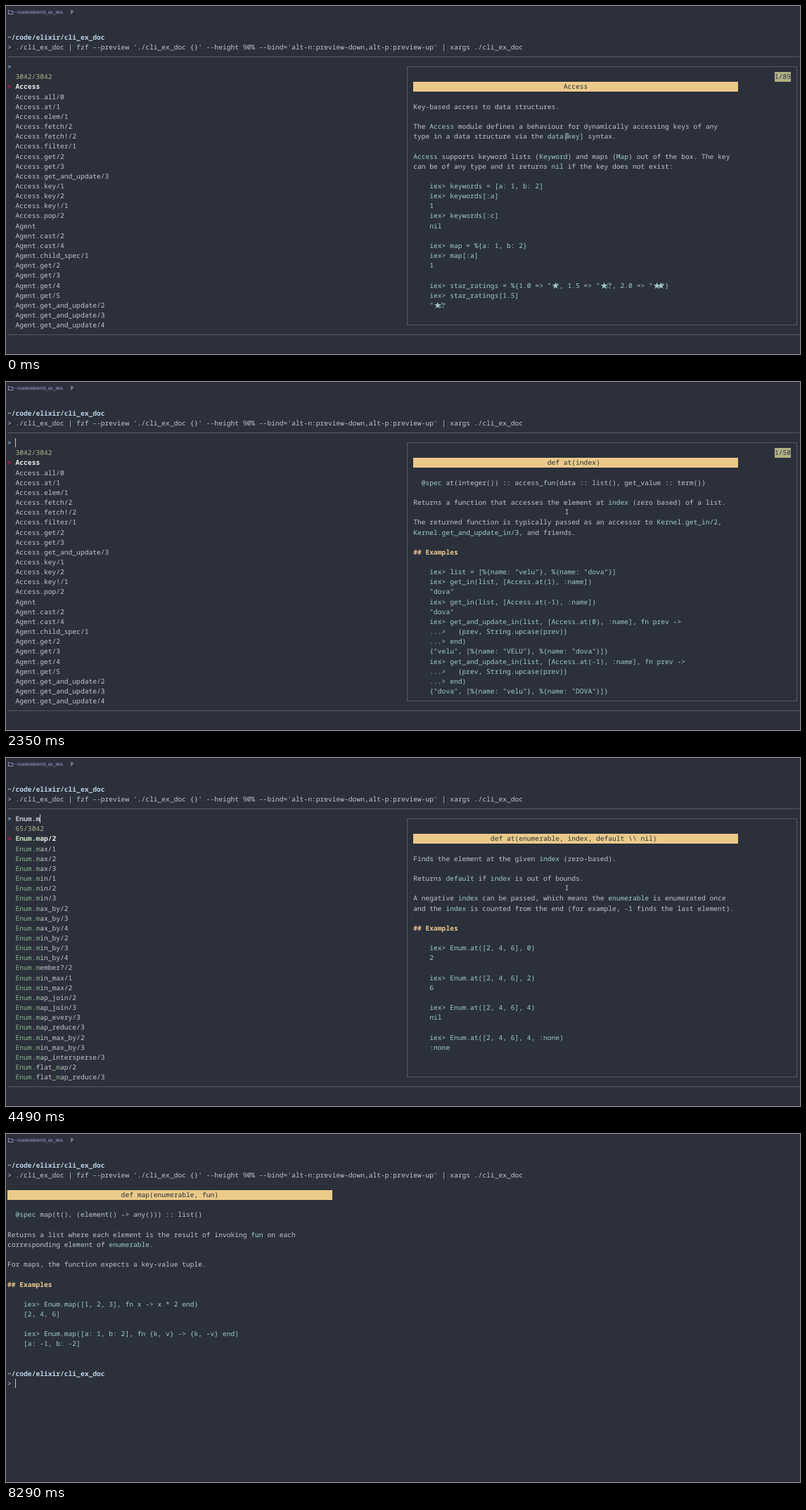
An HTML page with a canvas that plays this animation: 1129x496 px, repeating every 8.99 s.

```html
<!DOCTYPE html>
<html lang="en">
<head>
<meta charset="utf-8">
<title>Terminal documentation browser</title>
<style>
  html, body { margin: 0; width: 100%; height: 100%; overflow: hidden; background: #2b303b; }
  canvas { display: block; width: 1129px; height: 496px; }
</style>
</head>
<body>
<canvas></canvas>
<script>
const WIDTH = 1129, HEIGHT = 496, LOOP = 8990;
const CELL = 5.772, LINE = 14.16, LEFT = 2, TOP = 44.3;
const MONO = '"Noto Sans Mono", monospace';
const PREVIEW_COL = 100, LIST_ROW = 5, LIST_SIZE = 25;
const C = {
  bg: '#2b303b', text: '#c0c5ce', path: '#c0d5e6', teal: '#a0cbc5', yellow: '#ebca89',
  info: '#b2b186', border: '#555a63', prompt: '#87afd7', pointer: '#dc1448',
  bright: '#f0f0f0', match: '#87af87', brightMatch: '#c3e0bd', tab: '#b7a2e6'
};

const CWD = '~/code/elixir/cli_ex_doc';
const COMMAND = "> ./cli_ex_doc | fzf --preview './cli_ex_doc {}' --height 90% " +
  "--bind='alt-n:preview-down,alt-p:preview-up' | xargs ./cli_ex_doc";

// Words starting with a dot get the module name in front.
const names = (module, words) => words.split(' ').map(w => w[0] === '.' ? module + w : w);

const ALL = [
  ...names('Access', 'Access .all/0 .at/1 .elem/1 .fetch/2 .fetch!/2 .filter/1 .get/2 .get/3 ' +
    '.get_and_update/3 .key/1 .key/2 .key!/1 .pop/2'),
  ...names('Agent', 'Agent .cast/2 .cast/4 .child_spec/1 .get/2 .get/3 .get/4 .get/5 ' +
    '.get_and_update/2 .get_and_update/3 .get_and_update/4')
];
const ENUM = names('Enum', 'Enum .at/2 .at/3 Macro.Env .map/2 .max/1 .max/2 .max/3 .min/1 .min/2 .min/3 ' +
  '.sum/1 .zip/1 .zip/2 Enumerable .all?/1 .all?/2 .any?/1 .any?/2 .drop/2 .each/2 .find/2 .find/3 ' +
  '.into/2 .into/3 .join/1 .join/2 .sort/1 .sort/2');
const ENUM_M = names('Enum', '.map/2 .max/1 .max/2 .max/3 .min/1 .min/2 .min/3 .max_by/2 .max_by/3 .max_by/4 ' +
  '.min_by/2 .min_by/3 .min_by/4 .member?/2 .min_max/1 .min_max/2 .map_join/2 .map_join/3 .map_every/3 ' +
  '.map_reduce/3 .min_max_by/2 .min_max_by/3 .map_intersperse/3 .flat_map/2 .flat_map_reduce/3 .filter_map/3');

const COUNTS = { '': 3042, E: 618, En: 333, Enu: 171, Enum: 158, 'Enum.': 142, 'Enum.m': 65, 'Enum.ma': 34, 'Enum.map': 9 };

function matches(query) {
  if (!query) return ALL;
  const tail = query.split('.')[1];
  const found = tail ? ENUM_M.filter(n => n.includes(tail, 5)) : ENUM.filter(n => n.includes(query));
  return found.slice(0, LIST_SIZE);
}

// First line is the title; bars toggle the highlight colour.
const doc = (count, text) => {
  const [title, ...lines] = text.split('\n');
  return { count, title, lines };
};

const DOCS = {
  access: doc('1/89', `Access
Key-based access to data structures.

The |Access| module defines a behaviour for dynamically accessing keys of any
type in a data structure via the |data[key]| syntax.

|Access| supports keyword lists (|Keyword|) and maps (|Map|) out of the box. The key
can be of any type and it returns |nil| if the key does not exist:

    iex> keywords = [a: 1, b: 2]
    iex> keywords[:a]
    1
    iex> keywords[:c]
    nil

    iex> map = %{a: 1, b: 2}
    iex> map[:a]
    1

    iex> star_ratings = %{1.0 => "★", 1.5 => "★☆", 2.0 => "★★"}
    iex> star_ratings[1.5]
    "★☆"`),
  all: doc('1/36', `def all()
  |@spec| all() :: access_fun(data :: list(), get_value :: list())

Returns a function that accesses all the elements in a list.

The returned function is typically passed as an accessor to |Kernel.get_in/2|,
|Kernel.get_and_update_in/3|, and friends.

## Examples

    iex> list = [%{name: "velu"}, %{name: "dova"}]
    iex> get_in(list, [Access.all(), :name])
    ["velu", "dova"]
    iex> get_and_update_in(list, [Access.all(), :name], fn prev ->
    ...>   {prev, String.upcase(prev)}
    ...> end)
    {["velu", "dova"], [%{name: "VELU"}, %{name: "DOVA"}]}
    iex> pop_in(list, [Access.all(), :name])
    {["velu", "dova"], [%{}, %{}]}

Here is an example that traverses the list dropping even numbers and
multiplying odd numbers by two:`),
  at: doc('1/50', `def at(index)
  |@spec| at(integer()) :: access_fun(data :: list(), get_value :: term())

Returns a function that accesses the element at |index| (zero based) of a list.

The returned function is typically passed as an accessor to |Kernel.get_in/2|,
|Kernel.get_and_update_in/3|, and friends.

## Examples

    iex> list = [%{name: "velu"}, %{name: "dova"}]
    iex> get_in(list, [Access.at(1), :name])
    "dova"
    iex> get_in(list, [Access.at(-1), :name])
    "dova"
    iex> get_and_update_in(list, [Access.at(0), :name], fn prev ->
    ...>   {prev, String.upcase(prev)}
    ...> end)
    {"velu", [%{name: "VELU"}, %{name: "dova"}]}
    iex> get_and_update_in(list, [Access.at(-1), :name], fn prev ->
    ...>   {prev, String.upcase(prev)}
    ...> end)
    {"dova", [%{name: "velu"}, %{name: "DOVA"}]}`),
  elem: doc('1/32', `def elem(index)
  |@spec| elem(non_neg_integer()) ::
          access_fun(data :: tuple(), get_value :: term())

Returns a function that accesses the element at the given index in a tuple.

The returned function is typically passed as an accessor to |Kernel.get_in/2|,
|Kernel.get_and_update_in/3|, and friends.

The returned function raises if |index| is out of bounds.

Note that popping elements out of tuples is not possible and raises an error.

## Examples

    iex> map = %{user: {"velu", 27}}
    iex> get_in(map, [:user, Access.elem(0)])
    "velu"
    iex> get_and_update_in(map, [:user, Access.elem(0)], fn prev ->
    ...>   {prev, String.upcase(prev)}
    ...> end)
    {"velu", %{user: {"VELU", 27}}}
    iex> pop_in(map, [:user, Access.elem(0)])`),
  enum: doc('1/41', `Enum
Provides a set of algorithms to work with enumerables.

In Elixir, an enumerable is any data type that implements the |Enumerable|
protocol. |List|s (|[1, 2, 3]|), |Map|s (|%{foo: 1, bar: 2}|) and |Range|s (|1..3|)
are common data types used as enumerables:

    iex> Enum.map([1, 2, 3], fn x -> x * 2 end)
    [2, 4, 6]

    iex> Enum.sum([1, 2, 3])
    6

    iex> Enum.map(1..3, fn x -> x * 2 end)
    [2, 4, 6]

    iex> map = %{"a" => 1, "b" => 2}
    iex> Enum.map(map, fn {k, v} -> {k, v * 2} end)
    [{"a", 2}, {"b", 4}]

However, many other enumerables exist in the language, such as |MapSet|s and
the data type returned by |File.stream!/3| which allows a file to be traversed`),
  enumAt: doc('', String.raw`def at(enumerable, index, default \\ nil)
Finds the element at the given |index| (zero-based).

Returns |default| if |index| is out of bounds.

A negative |index| can be passed, which means the |enumerable| is enumerated once
and the |index| is counted from the end (for example, |-1| finds the last element).

## Examples

    iex> Enum.at([2, 4, 6], 0)
    2

    iex> Enum.at([2, 4, 6], 2)
    6

    iex> Enum.at([2, 4, 6], 4)
    nil

    iex> Enum.at([2, 4, 6], 4, :none)
    :none`),
  enumMap: doc('', `def map(enumerable, fun)
  |@spec| map(t(), (element() -> any())) :: list()

Returns a list where each element is the result of invoking |fun| on each
corresponding element of |enumerable|.

For maps, the function expects a key-value tuple.

## Examples

    iex> Enum.map([1, 2, 3], fn x -> x * 2 end)
    [2, 4, 6]

    iex> Enum.map([a: 1, b: 2], fn {k, v} -> {k, -v} end)
    [a: -1, b: -2]`)
};

// Each step changes part of the state from its time on.
const STEPS = [
  [0, { screen: 'finder', selected: 0, query: '', doc: 'access', caret: false, mouse: true }],
  [150, { caret: true }],
  [390, { selected: 2 }],
  [690, { doc: 'all', caret: false }],
  [980, { doc: 'at' }],
  [1150, { caret: true }],
  [1310, { selected: 3 }],
  [1610, { doc: 'elem' }],
  [1750, { caret: false }],
  [2050, { selected: 2, caret: true }],
  [2200, { selected: 1 }],
  [2350, { selected: 0, doc: 'at' }],
  [2650, { doc: 'all', caret: false }],
  [2830, { doc: 'access' }],
  [3270, { caret: true }],
  [3570, { query: 'E' }],
  [3720, { query: 'En' }],
  [3870, { query: 'Enu' }],
  [4040, { query: 'Enum', doc: 'enum' }],
  [4190, { query: 'Enum.' }],
  [4490, { query: 'Enum.m', doc: 'enumAt' }],
  [4650, { query: 'Enum.ma' }],
  [4820, { query: 'Enum.map', doc: 'enumMap' }],
  [5720, { caret: false }],
  [6320, { caret: true }],
  [6470, { screen: 'waiting' }],
  [6770, { screen: 'printed' }],
  [7850, { caret: false }],
  [8150, { caret: true }],
  [8290, { mouse: false }]
];

const canvas = document.querySelector('canvas');
const ratio = window.devicePixelRatio || 1;
canvas.width = WIDTH * ratio;
canvas.height = HEIGHT * ratio;
const ctx = canvas.getContext('2d');
ctx.scale(ratio, ratio);
ctx.textRendering = 'geometricPrecision';

const colX = col => LEFT + col * CELL;
const rowY = row => TOP + row * LINE;

function rect(x, y, w, h, color) {
  ctx.fillStyle = color;
  ctx.fillRect(x, y, w, h);
}

function put(text, col, row, color = C.text, bold = false) {
  ctx.fillStyle = color;
  [...text].forEach((char, i) => {
    const star = char === '★' || char === '☆';
    ctx.font = star ? '13px "DejaVu Sans", sans-serif' : `${bold ? 'bold ' : ''}9.62px ${MONO}`;
    if (char !== ' ') ctx.fillText(char, colX(col + i), rowY(row) + (star ? 4.4 : 3.3));
  });
}

function putCaret(col, row) {
  rect(Math.floor(LEFT + 0.4 + col * CELL), Math.round(rowY(row) - 6.8), 1, 13, C.text);
}

function putRich(line, col, row) {
  if (line.startsWith('## ')) return put(line, col, row, C.yellow, true);
  if (/^ {4}\S/.test(line)) return put(line, col, row, C.teal);
  line.split('|').forEach((part, i) => {
    put(part, col, row, i % 2 ? C.teal : C.text);
    col += part.length;
  });
}

function drawDoc({ title, lines }, col, row) {
  rect(Math.round(colX(col)), Math.round(rowY(row) - LINE / 2), 462, 14, C.yellow);
  put(title, col + Math.floor((80 - title.length) / 2), row, C.bg);
  lines.forEach((line, i) => putRich(line, col, row + 2 + i));
}

function drawItem(name, row, query, selected) {
  put(name, 2, row, selected ? C.bright : C.text, selected);
  let from = 0;
  for (const part of query.match(/[^.]+\.?/g) || []) {
    const at = name.indexOf(part, from);
    from = at + part.length;
    // Repaint matched cells in the highlight colour.
    rect(colX(2 + at), rowY(row) - 7, part.length * CELL, 14, C.bg);
    put(part, 2 + at, row, selected ? C.brightMatch : C.match, selected);
  }
}

function drawFinder({ query, selected, doc, caret }) {
  rect(2, 72, 1126, 1, C.border);
  rect(2, 468, 1126, 1, C.border);
  ctx.strokeStyle = C.border;
  ctx.lineWidth = 1;
  ctx.strokeRect(570.5, 86.5, 554, 368);

  put('>', 0, 3, C.prompt, true);
  put(query, 2, 3, C.text, true);
  if (caret) putCaret(2 + query.length, 3);
  put(COUNTS[query] + '/3042', 2, 4, C.info);
  put('>', 0, LIST_ROW + selected, C.pointer, true);
  matches(query).forEach((name, i) => drawItem(name, LIST_ROW + i, query, i === selected));

  const page = DOCS[doc];
  drawDoc(page, PREVIEW_COL, 5);
  if (page.count) {
    rect(1093, 94, 23, 14, C.info);
    put(page.count, 189, 4, C.bg);
  }
}

function drawPrinted({ caret }) {
  drawDoc(DOCS.enumMap, 0, 3);
  put(CWD, 0, 21, C.path, true);
  put('>', 0, 22);
  if (caret) putCaret(2, 22);
}

function stroke(path, color, width) {
  ctx.strokeStyle = color;
  ctx.lineWidth = width;
  ctx.stroke(new Path2D(path));
}

function drawTab() {
  stroke('M3.5 11.5V6.5H6L7 7.5H10V11.5Z', C.tab, 0.8);
  ctx.fillStyle = C.tab;
  ctx.font = '6.65px "Liberation Sans", sans-serif';
  ctx.fillText(CWD, 12.5, 11.2);
  stroke('M93 6.5V11.5M93 10Q95 9.5 95.2 7.5M92.3 6.5H93.7M94.5 7H96', C.text, 0.8);
}

function drawMouse() {
  const beam = 'M795.8 181.5Q797.5 181.5 797.5 183V187Q797.5 188.5 795.8 188.5' +
    'M799.2 181.5Q797.5 181.5 797.5 183M797.5 187Q797.5 188.5 799.2 188.5';
  stroke(beam, C.bg, 2);
  stroke(beam, C.text, 0.9);
}

function draw(state) {
  rect(0, 0, WIDTH, HEIGHT, C.bg);
  drawTab();
  put(CWD, 0, 0, C.path, true);
  put(COMMAND, 0, 1);
  if (state.screen === 'finder') drawFinder(state);
  else if (state.screen === 'printed') drawPrinted(state);
  else if (state.caret) putCaret(0, 2);
  if (state.mouse) drawMouse();
}

const start = performance.now();
let shown = 0;

function tick() {
  const time = Math.max(0, performance.now() - start) % LOOP;
  const past = STEPS.filter(([at]) => at <= time);
  if (past.length !== shown) {
    shown = past.length;
    draw(Object.assign({}, ...past.map(([, change]) => change)));
  }
  requestAnimationFrame(tick);
}
tick();
</script>
</body>
</html>
```
